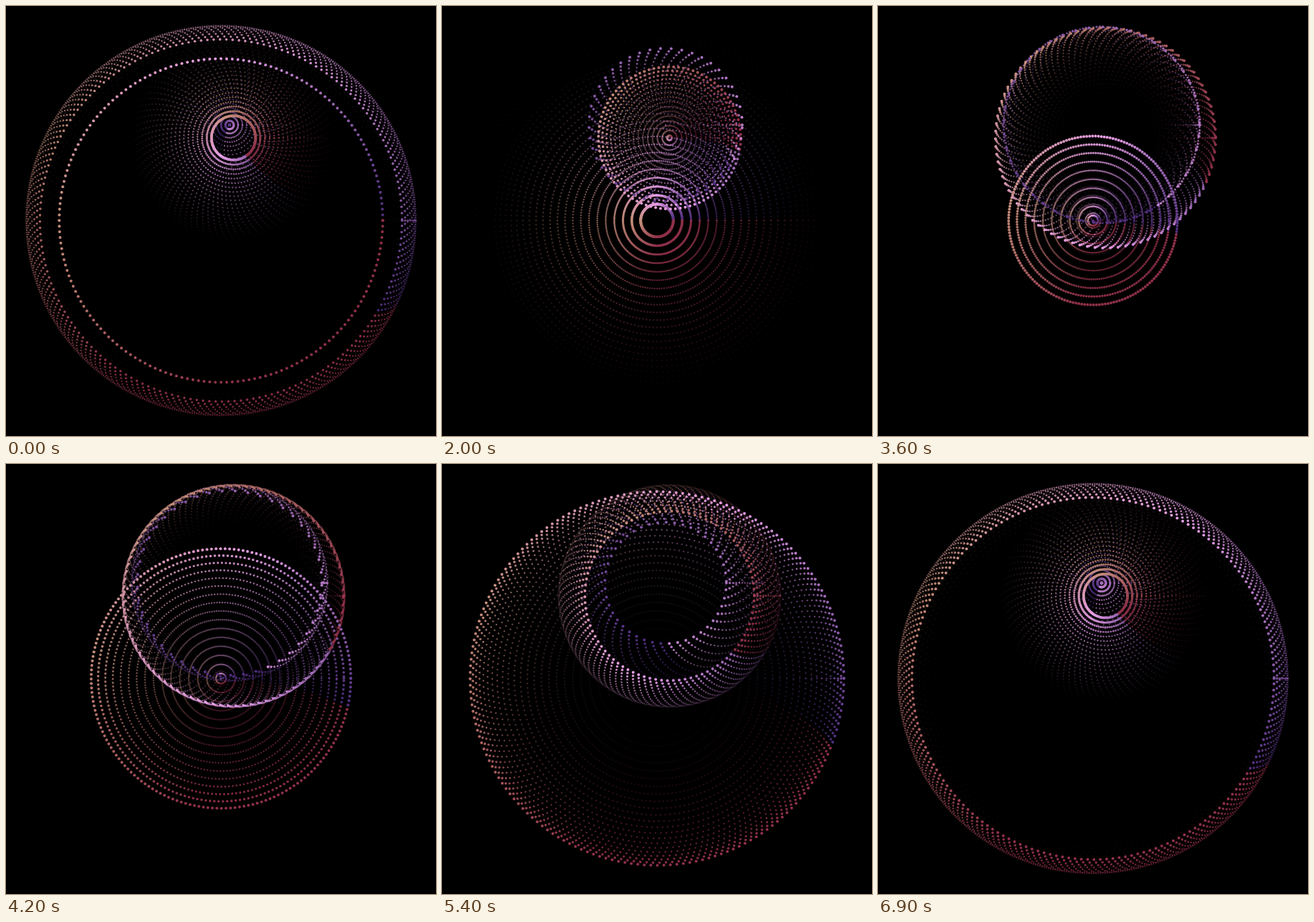
An HTML page with a canvas that plays this animation: 600 px wide and 600 px high, repeating every 7 s.

```html
<!DOCTYPE html>
<html lang="en">
<head>
<meta charset="utf-8">
<title>Pulsing dot rings</title>
<style>
  html, body { margin: 0; width: 100%; height: 100%; overflow: hidden; background: #000; }
  canvas { display: block; width: 600px; height: 600px; }
</style>
</head>
<body>
<canvas id="stage" width="600" height="600"></canvas>
<script>
const ctx = document.getElementById('stage').getContext('2d');
const STEP = 100, STEPS = 70, CYCLE = 69, TRAIL = 26;
const TAU = Math.PI * 2, DEG = Math.PI / 180;

const RED = [142, 48, 72], TAN = [196, 142, 122], PINK = [230, 158, 230], PURPLE = [76, 44, 124];
const PALETTE = [RED, RED, TAN, PINK, PURPLE];

function shade(x) {
  const pos = x * (PALETTE.length - 1);
  const i = Math.min(Math.floor(pos), PALETTE.length - 2);
  return `rgb(${PALETTE[i].map((v, k) => Math.round(v + (PALETTE[i + 1][k] - v) * (pos - i)))})`;
}

// Time runs a little slow in the first half of the loop and catches up in the second.
const warp = f => f - 0.35 * Math.sin(TAU * f / STEPS);

// Each pose gives the ring's scale (0..1) and its rotation in degrees.
const pulse = (start, turn) => t => {
  const p = (t - start) / CYCLE + (t < start ? 1 : 0);
  return { scale: Math.abs(Math.sin(Math.PI * p)), rot: turn * p };
};

// Closes, rests at the centre, then opens while turning.
const closeAndOpen = (shut, open, turn) => t => ({
  scale: Math.sin(Math.PI * Math.max(shut - t, t - open, 0) / CYCLE),
  rot: turn * Math.max(0, t - shut) / CYCLE
});

function makeRing(x, y, r, count, from, to, pose) {
  const colors = Array.from({ length: count }, (_, i) => shade(from + (to - from) * i / count));
  return { x, y, r, count, colors, pose };
}

const rings = [
  makeRing(300, 299.3, 272, 180, 0, 1, closeAndOpen(21.5, 26.2, 46)),
  makeRing(317.5, 184, 155, 90, 0.88, 0.2, pulse(4.4, 60)),
  makeRing(312, 166, 137, 45, 1, 0.8, pulse(0, 120))
];

function dot(ring, radius, angle, size, color) {
  ctx.fillStyle = color;
  ctx.beginPath();
  ctx.arc(ring.x + radius * Math.cos(angle), ring.y + radius * Math.sin(angle), size, 0, TAU);
  ctx.fill();
}

function drawRing(ring, f, age) {
  const { scale, rot } = ring.pose(warp(f));
  const radius = ring.r * scale, turn = rot * DEG;
  const size = Math.max(1.2, 2 - 0.2 * age);
  ctx.globalAlpha = (1 - age / TRAIL) ** 2;
  ring.colors.forEach((c, i) => dot(ring, radius, turn + i / ring.count * TAU, size, c));
  // a fixed dot marks the seam at three o'clock
  const seam = Math.floor((1 - turn / TAU) * ring.count) % ring.count;
  dot(ring, radius, 0, size, ring.colors[seam]);
}

function draw(f) {
  ctx.globalAlpha = 1;
  ctx.fillStyle = '#000';
  ctx.fillRect(0, 0, 600, 600);
  for (let age = TRAIL - 1; age >= 0; age--) {
    const past = (f - age + STEPS) % STEPS;
    rings.forEach(ring => drawRing(ring, past, age));
  }
}

let shown = -1;
function tick() {
  const f = Math.floor(performance.now() / STEP) % STEPS;
  if (f !== shown) draw(shown = f);
  requestAnimationFrame(tick);
}
tick();
</script>
</body>
</html>
```
